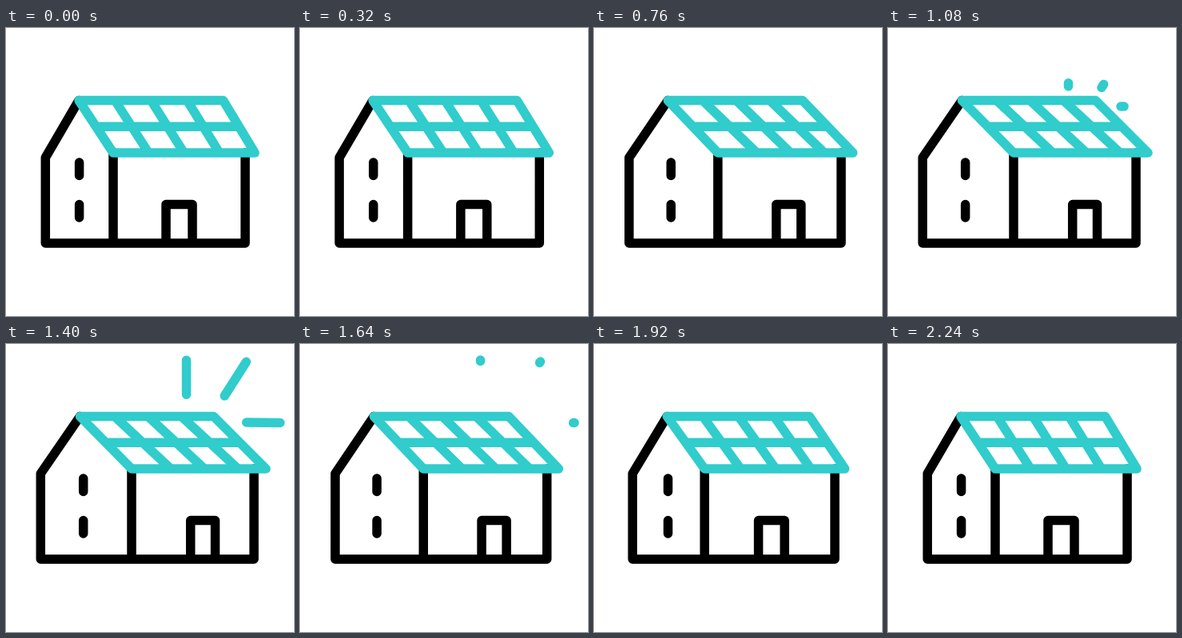
Recreate the animation shown at these times as an HTML page. Size 360 px wide and 360 px high, loop 2320 ms.

```html
<!DOCTYPE html>
<html lang="en">
<head>
<meta charset="utf-8">
<title>Solar house</title>
<style>
  html, body { margin: 0; height: 100%; overflow: hidden; background: #fff; }
  svg { display: block; width: 100%; height: 100%; }
  path { fill: none; stroke: #31cccc; stroke-width: 11.5; stroke-linecap: round; stroke-linejoin: round; }
  #house { stroke: #000; }
</style>
</head>
<body>
<svg viewBox="0 0 360 360">
  <path id="house"/>
  <path id="roof"/>
  <path id="rays"/>
</svg>
<script>
const LOOP = 2320, STEP = 40;
const TOP = 90.5, EAVES = 156, FLOOR = 269;
// Each ray travels from its first point to its second.
const RAYS = [
  [225.5, 73, 225.5, 20],
  [267, 74.5, 300.5, 22],
  [291, 98, 343, 98.5]
];

const [house, roof, rays] = ['house', 'roof', 'rays'].map(id => document.getElementById(id));
const mix = (a, b, u) => a + (b - a) * u;
const line = (x1, y1, x2, y2) => `M${x1} ${y1}L${x2} ${y2}`;

function ease(t, start, end) {
  const u = Math.min(1, Math.max(0, (t - start) / (end - start)));
  return u < .5 ? 4 * u ** 3 : 1 - 4 * (1 - u) ** 3;
}

function drawHouse(turn) {
  const at = (a, b) => mix(a, b, turn);
  const left = at(49.3, 43.3), apex = at(91, 92.5), corner = at(134, 157), right = at(299, 310);
  const doorL = at(200, 230.7), doorR = at(233, 261.5), win = at(91.6, 96.7);
  house.setAttribute('d',
    `M${apex} ${TOP}L${left} 162V${FLOOR}H${right}V${EAVES}` +
    line(corner, EAVES, corner, FLOOR) +
    `M${doorL} ${FLOOR}V220.5H${doorR}V${FLOOR}` +
    line(win, 168, win, 184.5) + line(win, 220.5, win, 237));

  const ridgeEnd = at(271.5, 259.5), eavesEnd = at(311, 325);
  let d = `M${apex} ${TOP}H${ridgeEnd}L${eavesEnd} ${EAVES}H${corner}Z`;
  d += line((apex + corner) / 2, (TOP + EAVES) / 2, (ridgeEnd + eavesEnd) / 2, (TOP + EAVES) / 2);
  // The panel dividers lean further than the roof's sides as it turns.
  for (const u of [.25, .5, .75])
    d += line(mix(apex, ridgeEnd, u) + at(0, 1.5), TOP, mix(corner, eavesEnd, u) + at(0, 7), EAVES);
  roof.setAttribute('d', d);
}

function drawRays(tail, head) {
  const shown = head - tail > .001;
  rays.setAttribute('d', shown ? RAYS.map(([x1, y1, x2, y2]) =>
    line(mix(x1, x2, tail), mix(y1, y2, tail), mix(x1, x2, head), mix(y1, y2, head))).join('') : '');
}

function frame() {
  const t = Math.floor(performance.now() % LOOP / STEP) * STEP;
  drawHouse(ease(t, 160, 1000) - ease(t, 1380, 2220));
  drawRays(ease(t, 1210, 1740), ease(t, 940, 1460));
  requestAnimationFrame(frame);
}
frame();
</script>
</body>
</html>
```
